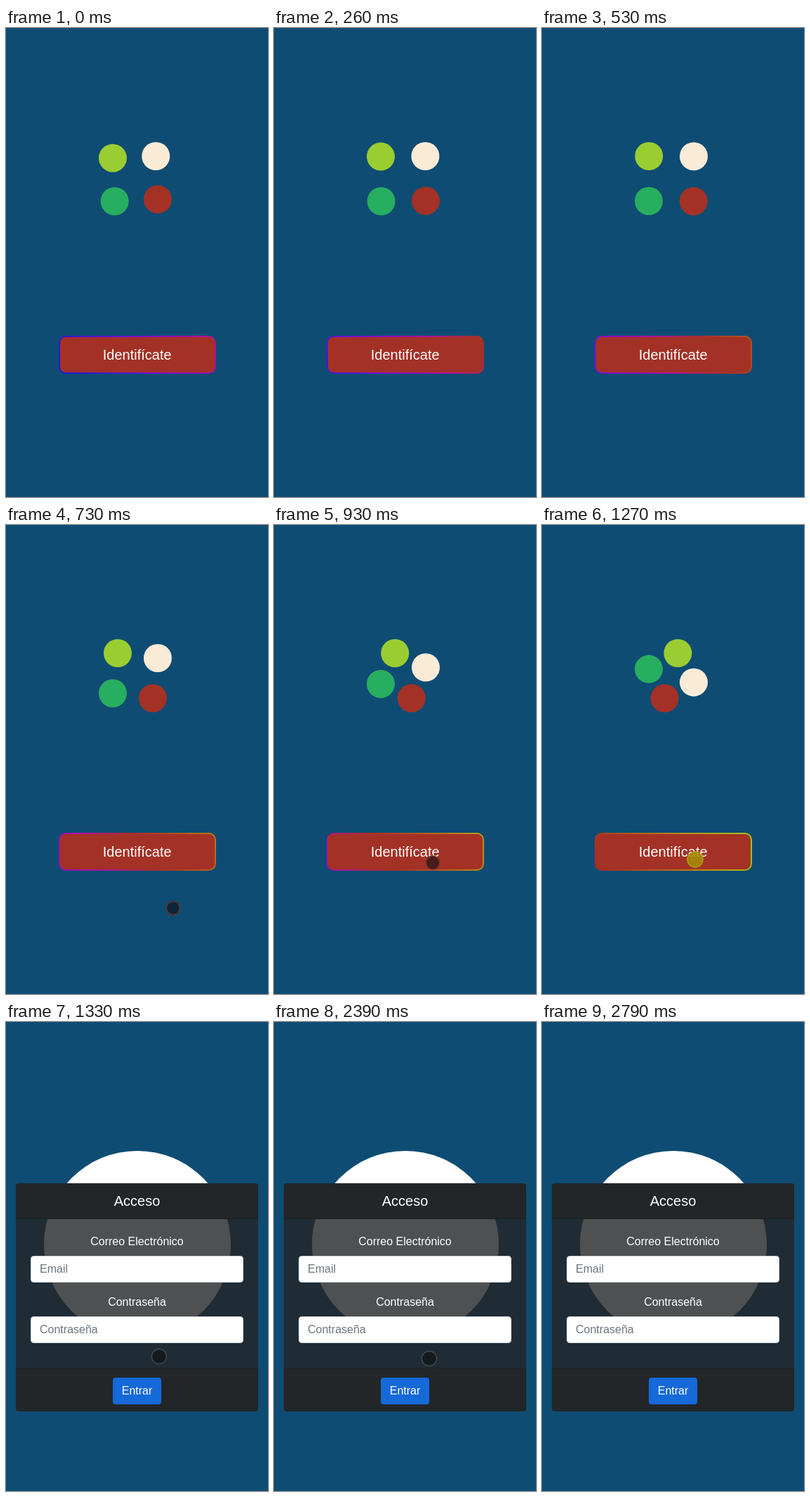
An HTML page that plays this animation: 373 px wide and 666 px high, repeating every 3.58 s.

```html
<!DOCTYPE html>
<html lang="es">
<head>
<meta charset="utf-8">
<title>Acceso</title>
<style>
  html, body { margin: 0; width: 100%; height: 100%; overflow: hidden; background: #0f4c73; }
  svg { display: block; width: 373px; height: 666px; }
  text { font: 16px "Liberation Sans", Arial, sans-serif; fill: #fff; }
  .center { text-anchor: middle; }
  .large { font-size: 20px; }
  .hint { fill: #6c757d; }
  .input { fill: #fff; stroke: #ced4da; }
</style>
</head>
<body>
<svg viewBox="0 0 373 666">
  <defs>
    <linearGradient id="rainbow" gradientUnits="userSpaceOnUse" x1="75" y1="464" x2="512" y2="212">
      <stop offset="0" stop-color="#2418d8"/>
      <stop offset=".21" stop-color="#7a10d6"/>
      <stop offset=".38" stop-color="#b0109c"/>
      <stop offset=".51" stop-color="#a53128"/>
      <stop offset=".6" stop-color="#b25022"/>
      <stop offset=".77" stop-color="#b99612"/>
      <stop offset=".92" stop-color="#9cc81c"/>
      <stop offset="1" stop-color="#6ccc20"/>
    </linearGradient>
    <clipPath id="card"><rect x="14" y="229" width="345" height="324" rx="4"/></clipPath>
  </defs>

  <g id="welcome">
    <g id="dots">
      <circle r="20" fill="#9acd32"/>
      <circle r="20" fill="#faebd7"/>
      <circle r="20" fill="#a43125"/>
      <circle r="20" fill="#27ae60"/>
    </g>
    <rect x="76" y="438" width="222" height="52" rx="9" fill="#a43125" stroke="url(#rainbow)" stroke-width="2"/>
    <text class="center large" x="186.7" y="471">Identifícate</text>
  </g>

  <g id="login">
    <circle cx="187" cy="316" r="133" fill="#fff"/>
    <g clip-path="url(#card)">
      <rect x="14" y="279" width="345" height="213" fill="#232526" fill-opacity=".8"/>
      <rect x="14" y="229" width="345" height="50" fill="#222628"/>
      <rect x="14" y="492" width="345" height="61" fill="#222628"/>
      <path d="M14 279.5H359M14 491.5H359" stroke="#1c2225"/>
    </g>
    <text class="center large" x="186.5" y="261">Acceso</text>
    <text class="center" x="186.5" y="317">Correo Electrónico</text>
    <rect class="input" x="35.5" y="332.5" width="302" height="37" rx="4"/>
    <text class="hint" x="48" y="356">Email</text>
    <text class="center" x="186.5" y="403">Contraseña</text>
    <rect class="input" x="35.5" y="418.5" width="302" height="37" rx="4"/>
    <text class="hint" x="48" y="442">Contraseña</text>
    <rect x="152" y="505" width="69" height="38" rx="4" fill="#1569d8"/>
    <text class="center" x="186.5" y="529">Entrar</text>
  </g>

  <circle id="pointer"/>
</svg>
<script>
const LOOP = 3580, FPS = 15, LOGIN_AT = 1330;
const CORNERS = [[152, 182], [216, 182], [216, 246], [152, 246]];
const byId = id => document.getElementById(id);
const dots = [...byId("dots").children];
const pointer = byId("pointer");

function set(node, attributes) {
  for (const name in attributes) node.setAttribute(name, attributes[name]);
}

// cubic-bezier(.25, .1, .25, 1)
function ease(x) {
  let low = 0, high = 1;
  for (let i = 0; i < 24; i++) {
    const s = (low + high) / 2;
    if (.75 * s * (1 - s) + s ** 3 < x) low = s; else high = s;
  }
  const s = low;
  return .3 * s * (1 - s) ** 2 + 3 * s * s * (1 - s) + s ** 3;
}

// Each dot glides clockwise to the next corner every two seconds.
function drawDots(t) {
  const turn = (t - 515) / 2000 + 4;
  const step = Math.floor(turn), p = ease(turn - step);
  dots.forEach((dot, i) => {
    const [x0, y0] = CORNERS[(i + step) % 4];
    const [x1, y1] = CORNERS[(i + step + 1) % 4];
    set(dot, { cx: x0 + (x1 - x0) * p, cy: y0 + (y1 - y0) * p });
  });
}

function drawPointer(t) {
  const visible = t > 725 && t < 2790;
  const pressed = t > 1190 && t < LOGIN_AT;
  const remaining = Math.max(0, 1 - (t - 730) / 340);
  const leaving = Math.max(0, (t - 2340) / 390);
  set(pointer, {
    visibility: visible ? "visible" : "hidden",
    cx: 218 + 20 * remaining + 87 * leaving ** 1.8,
    cy: 475 + 71 * remaining ** 3 + 182 * leaving ** 2.2,
    r: pressed ? 11 : t < LOGIN_AT ? 9.5 : 10.5,
    fill: pressed ? "rgba(165,140,5,.88)" : "rgba(10,14,16,.6)",
    stroke: pressed ? "#b09c18" : t < LOGIN_AT ? "#70302c" : "#41484b",
    "stroke-width": 1.5
  });
}

function draw() {
  const elapsed = performance.now() % LOOP;
  const t = Math.floor((elapsed + 10) * FPS / 1000) * 1000 / FPS;
  const loggedIn = t >= LOGIN_AT;
  byId("welcome").style.display = loggedIn ? "none" : "";
  byId("login").style.display = loggedIn ? "" : "none";
  drawDots(t);
  set(byId("rainbow"), { gradientTransform: `translate(${-.233 * t} 0)` });
  drawPointer(t);
  requestAnimationFrame(draw);
}
draw();
</script>
</body>
</html>
```
